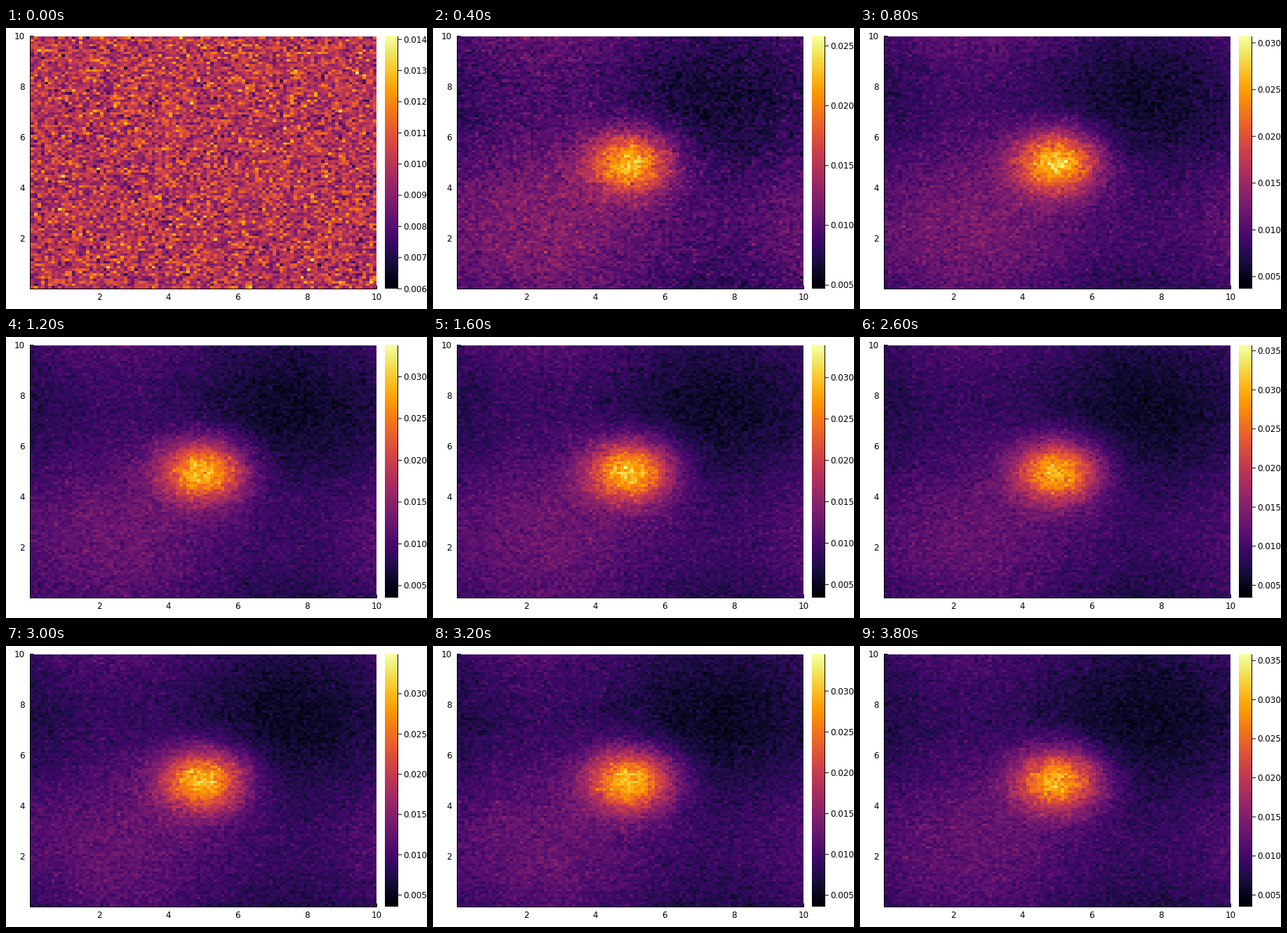
Animation, 600 px wide and 400 px high, one loop 4 s. Source, as a matplotlib script:

```python
import math

import numpy as np
import matplotlib.pyplot as plt
from matplotlib.animation import FuncAnimation

W, H, DPI = 600, 400, 100
FRAMES, INTERVAL = 20, 200
LEFT, RIGHT, TOP, BOTTOM = 34.5, 528.5, 11.5, 371.5
BAR_L, BAR_R, BAR_T, BAR_B = 540, 558, 11.8, 371.2
N = 100
PX = 72 / DPI
FONT = dict(family="DejaVu Sans", fontsize=12 * PX, color="black")

# Colour limits at key steps, in counts of 1e-4
HI = ([0, 1, 2, 3, 4, 7, 8, 11, 13, 14, 16, 18, 19],
      [141, 205, 258, 287, 307, 353, 339, 339, 357, 353, 345, 350, 358])
LO = ([0, 1, 2, 3, 4, 8, 11, 13, 16, 19],
      [60, 54, 47, 41, 37, 34, 31, 34, 36, 35])

centres = (np.arange(N) + 0.5) * 10 / N
X, Y = np.meshgrid(centres, centres)
WAVE = 0.19 * (np.sin(X * math.pi / 5) + np.sin(Y * math.pi / 5))
PEAK = 2.35 * np.exp(-((X - 5) ** 2 + (Y - 5) ** 2) / 1.5)


def counts(i):
    """Histogram relaxing from uniform to the steady state."""
    wave = WAVE * (1 - math.exp(-0.8 * i))
    peak = PEAK * (1 - math.exp(-0.45 * i))
    p = 1 + wave + peak
    return np.random.default_rng(40 + i).poisson(100 * p / p.mean())


def tick_step(span):
    if span < 100:
        return 10
    return 20 if span < 160 else 50


fig = plt.figure(figsize=(W / DPI, H / DPI), dpi=DPI, facecolor="white")
ax = fig.add_axes([0, 0, 1, 1])
ax.set_axis_off()


def line(xs, ys, z=1):
    return ax.plot(xs, ys, color="black", lw=PX, zorder=z, snap=False,
                   solid_capstyle="butt")[0]


def label(x, y, s, ha):
    return ax.text(x, y, s, ha=ha, va="baseline", **FONT)


def image(data, x0, x1, y0, y1):
    return ax.imshow(data, cmap="inferno", origin="lower", aspect="auto",
                     interpolation="nearest", zorder=2,
                     extent=[x0, x1, y1, y0])


# Inward ticks lie beneath the heatmap, only the outermost show
line([LEFT, LEFT], [TOP - 0.5, BOTTOM + 0.5], 3)
line([LEFT - 0.5, RIGHT], [BOTTOM, BOTTOM], 3)
for v in range(2, 11, 2):
    tx = LEFT + (RIGHT - LEFT) * v / 10
    ty = BOTTOM - (BOTTOM - TOP) * v / 10
    line([tx, tx], [BOTTOM + 0.5, BOTTOM - 5])
    line([LEFT, LEFT + 5], [ty, ty])
    label(tx - 0.5, 387.4, str(v), "center")
    label(27, ty + 4.4, str(v), "right")

heat = image(np.ones((N, N)), 35, 528, 12, 371)
image(np.linspace(0, 1, 256)[:, None], BAR_L, BAR_R, BAR_T, BAR_B)
line([BAR_R + 0.5] * 2, [BAR_T, BAR_B], 3)

ticks = [(line([BAR_R, BAR_R + 6], [0, 0], 3), label(566, 0, "", "left"))
         for _ in range(12)]
ax.set_xlim(0, W)
ax.set_ylim(H, 0)


def update(i):
    lo, hi = np.interp(i, *LO), np.interp(i, *HI)
    heat.set_data(counts(i))
    heat.set_clim(lo, hi)
    step = tick_step(hi - lo)
    first = math.ceil(lo / step) * step
    for k, (mark, text) in enumerate(ticks):
        v = first + k * step
        shown = v <= hi
        y = BAR_B - (BAR_B - BAR_T) * (v - lo) / (hi - lo)
        mark.set_visible(shown)
        text.set_visible(shown)
        mark.set_ydata([y, y])
        text.set_y(y + 4.4)
        text.set_text(f"{v / 1e4:.3f}")
    return []


anim = FuncAnimation(fig, update, frames=FRAMES, interval=INTERVAL,
                     repeat=True, repeat_delay=0, blit=False)
plt.show()
```
